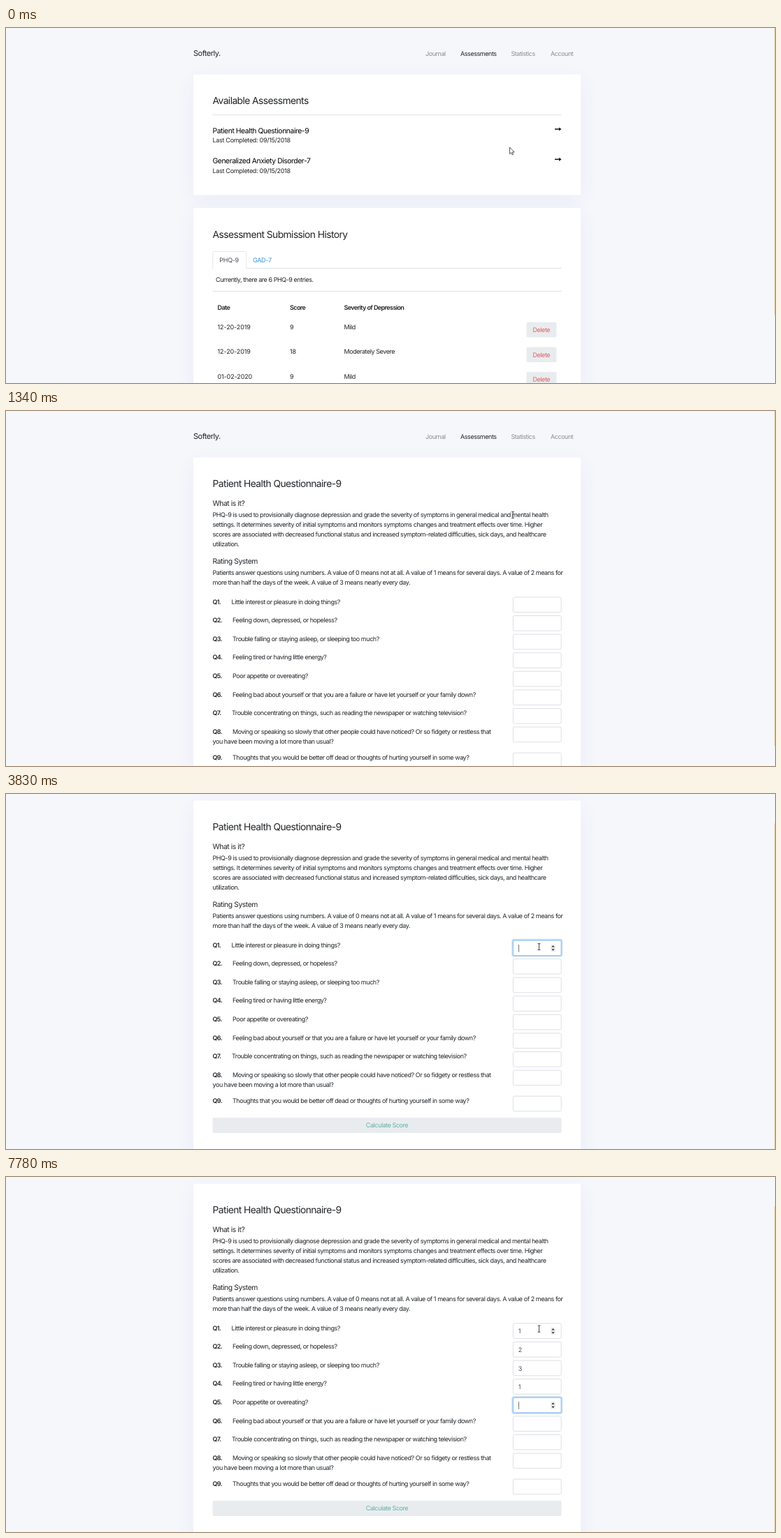
Write an HTML page with a canvas that moves like this. It is 1100x509 px and loops after 8000 ms.

```html
<!DOCTYPE html>
<html lang="en">
<head>
<meta charset="utf-8">
<title>Assessments</title>
<style>
html, body { margin: 0; width: 100%; height: 100%; overflow: hidden; background: #f5f7fb; }
canvas { display: block; width: 1100px; height: 509px; }
</style>
</head>
<body>
<canvas id="stage"></canvas>
<script>
const W = 1100, H = 509, LOOP = 8000;
const canvas = document.getElementById('stage');
const ctx = canvas.getContext('2d');
const dpr = window.devicePixelRatio || 1;
canvas.width = W * dpr;
canvas.height = H * dpr;

const INK = '#212529', LINE = '#dee2e6', GREY = '#e9ecef';
const LEFT = 295.5, RIGHT = 794.5;

// Text styles: font size, weight, letter spacing
const STYLES = {
  body: [9, 400, -0.445],
  date: [9, 400, -0.12],
  meta: [9, 400, -0.3],
  bold: [9, 600, -0.6],
  title: [13.85, 400, -0.58],
  sub: [10.4, 400, -0.45],
  brand: [11, 400, -0.5]
};

const clamp = v => Math.max(0, Math.min(1, v));
const phase = (t, start, len) => clamp((t - start) / len);
const mix = (a, b, k) => a + (b - a) * k;
const outQuad = k => 1 - (1 - k) * (1 - k);

// CSS "ease" curve, solved by bisection
function ease(x) {
  const bez = (u, a, b) => 3 * u * (1 - u) * (1 - u) * a + 3 * u * u * (1 - u) * b + u * u * u;
  let lo = 0, hi = 1;
  for (let i = 0; i < 20; i++) {
    const mid = (lo + hi) / 2;
    if (bez(mid, 0.25, 0.25) < x) lo = mid; else hi = mid;
  }
  return bez(lo, 0.1, 1);
}

// y is the visual middle of the line
function text(str, x, y, style = 'body', color = INK, align = 'left') {
  const [size, weight, spacing] = STYLES[style];
  ctx.font = `${weight} ${size}px Inter, sans-serif`;
  ctx.letterSpacing = spacing + 'px';
  ctx.textRendering = 'geometricPrecision'; // fractional glyph positions
  ctx.textAlign = align;
  ctx.fillStyle = color;
  ctx.fillText(str, x, y + size * 0.345);
}

function box(x, y, w, h, r, fill, stroke, lineWidth = 0.8) {
  ctx.beginPath();
  ctx.roundRect(x, y, w, h, r);
  if (fill) { ctx.fillStyle = fill; ctx.fill(); }
  if (stroke) { ctx.strokeStyle = stroke; ctx.lineWidth = lineWidth; ctx.stroke(); }
}

function poly(points, fill, stroke, lineWidth = 0.8) {
  ctx.beginPath();
  points.forEach(([x, y], i) => i ? ctx.lineTo(x, y) : ctx.moveTo(x, y));
  ctx.closePath();
  if (fill) { ctx.fillStyle = fill; ctx.fill(); }
  if (stroke) { ctx.strokeStyle = stroke; ctx.lineWidth = lineWidth; ctx.stroke(); }
}

function rule(x, y, x2, color = LINE) {
  ctx.fillStyle = color;
  ctx.fillRect(x, y - 0.5, x2 - x, 1);
}

function card(y, h) {
  ctx.save();
  ctx.shadowColor = 'rgba(70, 90, 170, 0.06)';
  ctx.shadowBlur = 30 * dpr;
  ctx.shadowOffsetY = 8 * dpr;
  box(268, y, 554, h, 2, '#fff');
  ctx.restore();
}

function nav() {
  text('Softerly.', 268, 36.5, 'brand');
  [['Journal', 600], ['Assessments', 650], ['Statistics', 722.5], ['Account', 779]].forEach(
    ([label, x], i) => text(label, x, 36.5, 'body', i === 1 ? INK : '#8b8d90'));
}

function arrow(x, y) {
  ctx.fillStyle = '#111';
  ctx.fillRect(x - 9.5, y - 0.75, 7, 1.5);
  poly([[x - 3.4, y - 2.6], [x, y], [x - 3.4, y + 2.6]], '#111');
}

function listPage(t) {
  card(66.5, 173);
  text('Available Assessments', LEFT, 104.5, 'title');
  rule(LEFT, 124.5, RIGHT, '#e3e4e6');
  const shift = 3 * ease(phase(t, 250, 200));
  ['Patient Health Questionnaire-9', 'Generalized Anxiety Disorder-7'].forEach((name, i) => {
    const y = 147 + i * 43.3;
    text(name, LEFT, y, 'sub', '#000');
    text('Last Completed: 09/15/2018', LEFT, y + 14.2, 'meta');
    arrow(RIGHT + (i ? 0 : shift), y - 2);
  });

  card(258, 345);
  text('Assessment Submission History', LEFT, 296, 'title');
  rule(LEFT, 344.5, RIGHT);
  box(LEFT + 0.3, 320.5, 48, 27, [2, 2, 0, 0], '#fff', LINE);
  ctx.fillStyle = '#fff';
  ctx.fillRect(LEFT - 1, 345, 51, 5);
  text('PHQ-9', 305.3, 332.5, 'meta', '#495057');
  text('GAD-7', 353, 332.5, 'meta', '#3490dc');
  text('Currently, there are 6 PHQ-9 entries.', 300, 361);
  rule(LEFT, 377.5, RIGHT);

  text('Date', 302.5, 400.8, 'bold');
  text('Score', 406, 400.8, 'bold');
  text('Severity of Depression', 483.5, 400.8, 'bold');
  const rows = [['12-20-2019', '9', 'Mild'], ['12-20-2019', '18', 'Moderately Severe'],
    ['01-02-2020', '9', 'Mild']];
  rows.forEach(([date, score, level], i) => {
    const y = 428.5 + i * 35.8;
    text(date, 302.5, y, 'date');
    text(score, 406, y, 'date');
    text(level, 483.5, y);
    box(744.5, y - 6.8, 43, 21.8, 2, GREY);
    text('Delete', 765.8, y + 4.2, 'body', '#e3605f', 'center');
  });
}

const ABOUT = [
  'PHQ-9 is used to provisionally diagnose depression and grade the severity of symptoms in general medical and mental health',
  'settings. It determines severity of initial symptoms and monitors symptoms changes and treatment effects over time. Higher',
  'scores are associated with decreased functional status and increased symptom-related difficulties, sick days, and healthcare',
  'utilization.'
];
const RATING = [
  'Patients answer questions using numbers. A value of 0 means not at all. A value of 1 means for several days. A value of 2 means for',
  'more than half the days of the week. A value of 3 means nearly every day.'
];
const QUESTIONS = [
  'Little interest or pleasure in doing things?',
  'Feeling down, depressed, or hopeless?',
  'Trouble falling or staying asleep, or sleeping too much?',
  'Feeling tired or having little energy?',
  'Poor appetite or overeating?',
  'Feeling bad about yourself or that you are a failure or have let yourself or your family down?',
  'Trouble concentrating on things, such as reading the newspaper or watching television?',
  'Moving or speaking so slowly that other people could have noticed? Or so fidgety or restless that',
  'Thoughts that you would be better off dead or thoughts of hurting yourself in some way?'
];

// When each field gains focus and receives its digit
const ENTRIES = [
  { focus: 3660, typed: 4670, digit: '1' },
  { focus: 5350, typed: 5920, digit: '2' },
  { focus: 6200, typed: 6770, digit: '3' },
  { focus: 6900, typed: 7320, digit: '1' },
  { focus: 7620, typed: Infinity, digit: '' }
];

function spinner(y) {
  box(779, y - 5.5, 7, 11, 1, '#efefef');
  poly([[780.3, y - 1.4], [782.5, y - 3.9], [784.7, y - 1.4]], '#333');
  poly([[780.3, y + 1.4], [782.5, y + 3.9], [784.7, y + 1.4]], '#333');
}

function field(i, y, t, hover) {
  const entry = ENTRIES[i];
  const end = ENTRIES[i + 1] ? ENTRIES[i + 1].focus : Infinity;
  const focused = entry && t >= entry.focus && t < end;
  const glow = entry ? ease(phase(t, entry.focus, 150)) * (1 - ease(phase(t, end, 150))) : 0;
  if (glow > 0) box(724.5, y - 0.9, 70.5, 23.4, 2.5, null, `rgba(52, 144, 220, ${0.3 * glow})`, 2.4);
  box(725.4, y, 68.8, 21.6, 2, '#fff', '#d3d8de');
  if (glow > 0) box(725.4, y, 68.8, 21.6, 2, null, `rgba(138, 194, 244, ${glow})`, 1);

  const mid = y + 11;
  const typed = entry && t >= entry.typed;
  if (typed) text(entry.digit, 732.8, mid + 0.4, 'date', '#495057');
  if (focused) {
    const hidden = typed ? t - entry.typed >= 550 : i === 0 && t >= 4110;
    ctx.fillStyle = '#495057';
    if (!hidden) ctx.fillRect(typed ? 738 : 733, mid - 5, 0.8, 10.6);
  }
  if (focused || hover) spinner(mid);
}

function formPage(t, cursor) {
  card(66.5, 560);
  text('Patient Health Questionnaire-9', LEFT, 104.5, 'title');
  text('What is it?', LEFT, 132.5, 'sub');
  ABOUT.forEach((line, i) => text(line, LEFT, 149.2 + i * 13.85));
  text('Rating System', LEFT, 215.2, 'sub');
  RATING.forEach((line, i) => text(line, LEFT, 232 + i * 13.85));

  const inFirst = t > 3090 && cursor.x > 725 && cursor.y > 209;
  QUESTIONS.forEach((question, i) => {
    const y = 273.5 + i * 26.6 + (i === 8 ? 10.5 : 0);
    const x = { 0: 322.5, 6: 323 }[i] || 324;
    text(`Q${i + 1}.`, LEFT, y, 'bold');
    text(question, x, y);
    if (i === 7) text('you have been moving a lot more than usual?', LEFT, y + 13.85);
    field(i, y - 6.6, t, i === 0 && inFirst);
  });
  box(LEFT, 521, RIGHT - LEFT, 22, 2, GREY);
  text('Calculate Score', 545, 532, 'body', t < 2270 ? '#8aa5b3' : '#5fb3a6', 'center');
}

// Pointer path: time, x, y
const PATH = [[30, 720.5, 171], [500, 724, 155], [810, 725, 149], [1500, 725, 149], [1540, 725, 149.6],
  [1700, 725, 149.6], [1730, 724.5, 151.2], [3060, 724.5, 151.2], [3300, 735, 172], [3620, 762.5, 219],
  [4110, 762.5, 219], [4230, 762.5, 217.6]];

function cursorAt(t) {
  let [, x, y] = PATH[0];
  for (let i = 1; i < PATH.length; i++) {
    const [t0, x0, y0] = PATH[i - 1], [t1, x1, y1] = PATH[i];
    if (t < t0) break;
    const k = phase(t, t0, t1 - t0);
    x = mix(x0, x1, k);
    y = mix(y0, y1, k);
  }
  let kind = 'beam';
  if (t < 1060) kind = y < 167 ? 'hand' : 'arrow';
  else if (t >= 2560 && (y < 169 || (y > 195 && y < 209))) kind = 'arrow';
  return { x, y, kind };
}

function drawCursor({ x, y, kind }) {
  ctx.save();
  ctx.translate(x, y);
  if (kind === 'arrow') {
    poly([[0, 0], [0, 9.6], [2.2, 7.6], [3.7, 10.9], [5.2, 10.2], [3.7, 7], [6.7, 7]], '#fff', '#222', 0.75);
  } else if (kind === 'hand') {
    poly([[-0.9, 0], [0.7, 0], [0.9, 3.6], [5, 4.5], [5.3, 7.5], [4.2, 11], [-0.7, 11], [-3.4, 7], [-2.7, 6],
      [-0.9, 7.2]], '#fff', '#222', 0.75);
  } else {
    ctx.fillStyle = '#333';
    ctx.fillRect(-0.45, -4.6, 0.9, 9.4);
    for (const sy of [-5, 4.2]) ctx.fillRect(-2, sy, 4, 0.8);
  }
  ctx.restore();
}

function draw(t) {
  const leaving = ease(phase(t, 830, 210));
  const entering = ease(phase(t, 1040, 300));
  const onList = t < 1040;
  const alpha = onList ? 1 - leaving : entering;
  const drop = 11.54 * (1 - alpha);
  const scroll = 57 * outQuad(phase(t, 2058, 225));
  const cursor = cursorAt(t);

  ctx.setTransform(dpr, 0, 0, dpr, 0, 0);
  ctx.globalAlpha = 1;
  ctx.fillStyle = '#f5f7fb';
  ctx.fillRect(0, 0, W, H);

  ctx.save();
  ctx.translate(0, -scroll);
  nav();
  ctx.translate(0, drop);
  ctx.globalAlpha = alpha;
  if (onList) listPage(t); else formPage(t, cursor);
  ctx.restore();

  // Edge of the scrollbar thumb
  ctx.fillStyle = '#e6cfa8';
  ctx.fillRect(1099, scroll * 0.74, 1, (onList ? 411 : 480) - drop * 0.8);
  drawCursor(cursor);
}

const began = performance.now();
function tick() {
  draw((performance.now() - began) % LOOP);
  requestAnimationFrame(tick);
}
tick();
</script>
</body>
</html>
```
